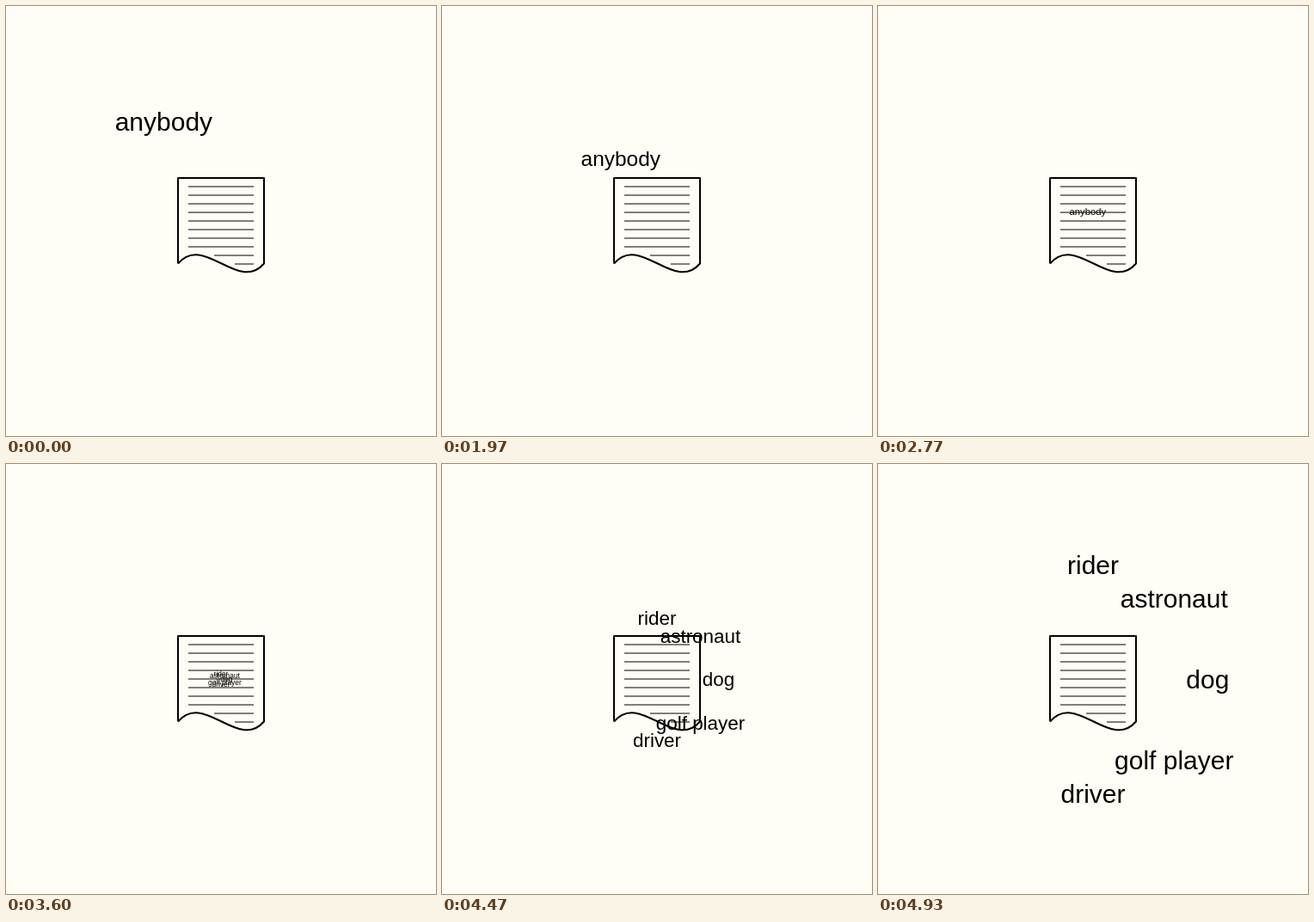
Recreate the animation shown at these times as an HTML page with a canvas. Size 500 by 500 pixels, loop 6660 ms.

```html
<!DOCTYPE html>
<html lang="en">
<head>
<meta charset="utf-8">
<title>Words through a page</title>
<style>
html, body { margin: 0; height: 100%; overflow: hidden; background: #fffdf5; }
canvas { display: block; }
</style>
</head>
<body>
<canvas id="stage" width="500" height="500"></canvas>
<script>
const ctx = document.getElementById('stage').getContext('2d');
const LOOP = 6660, STEP = 100 / 3, RADIUS = 133.3;
const IN = 49, MID = 98, OUT = 148; // steps where the phases begin and end
const WORDS = ['rider', 'astronaut', 'dog', 'golf player', 'driver'];

function line(x1, x2, y) {
  ctx.beginPath();
  ctx.moveTo(x1, y);
  ctx.lineTo(x2, y);
  ctx.stroke();
}

function page() {
  ctx.strokeStyle = '#000';
  ctx.lineWidth = 1;
  for (let y = 210; y <= 280; y += 10) line(212, 288, y);
  line(242, 288, 290);
  line(266, 288, 300);

  ctx.lineWidth = 2;
  ctx.lineJoin = 'round';
  ctx.beginPath();
  ctx.moveTo(200, 299.5);
  ctx.lineTo(200, 200);
  ctx.lineTo(300, 200);
  ctx.lineTo(300, 299.5);
  ctx.bezierCurveTo(270, 334, 230, 264, 200, 299.5);
  ctx.stroke();
}

// k: 0 at the centre, 1 at full distance and size
function word(text, degrees, k, power) {
  const angle = degrees * Math.PI / 180;
  const r = RADIUS * k ** power;
  const size = 3 + 27 * k;
  ctx.font = `${size}px Arial, "Liberation Sans", sans-serif`;
  ctx.fillText(text, 250 + r * Math.cos(angle), 250 + r * Math.sin(angle) + 0.36 * size);
}

function draw(ms) {
  const n = Math.floor((ms % LOOP + 4) / STEP);
  ctx.fillStyle = '#fffdf5';
  ctx.fillRect(0, 0, 500, 500);
  page();
  ctx.fillStyle = '#000';
  ctx.textAlign = 'center';
  if (n <= MID) {
    word('anybody', -120, Math.min(1, (MID - n) / (MID - IN)), 2);
  } else {
    const k = Math.min(1, (n - MID) / (OUT - MID));
    WORDS.forEach((text, i) => word(text, -90 + 45 * i, k, 1.9));
  }
}

let start;
function tick(now) {
  start ??= now;
  draw(now - start);
  requestAnimationFrame(tick);
}
draw(0);
requestAnimationFrame(tick);
</script>
</body>
</html>
```
